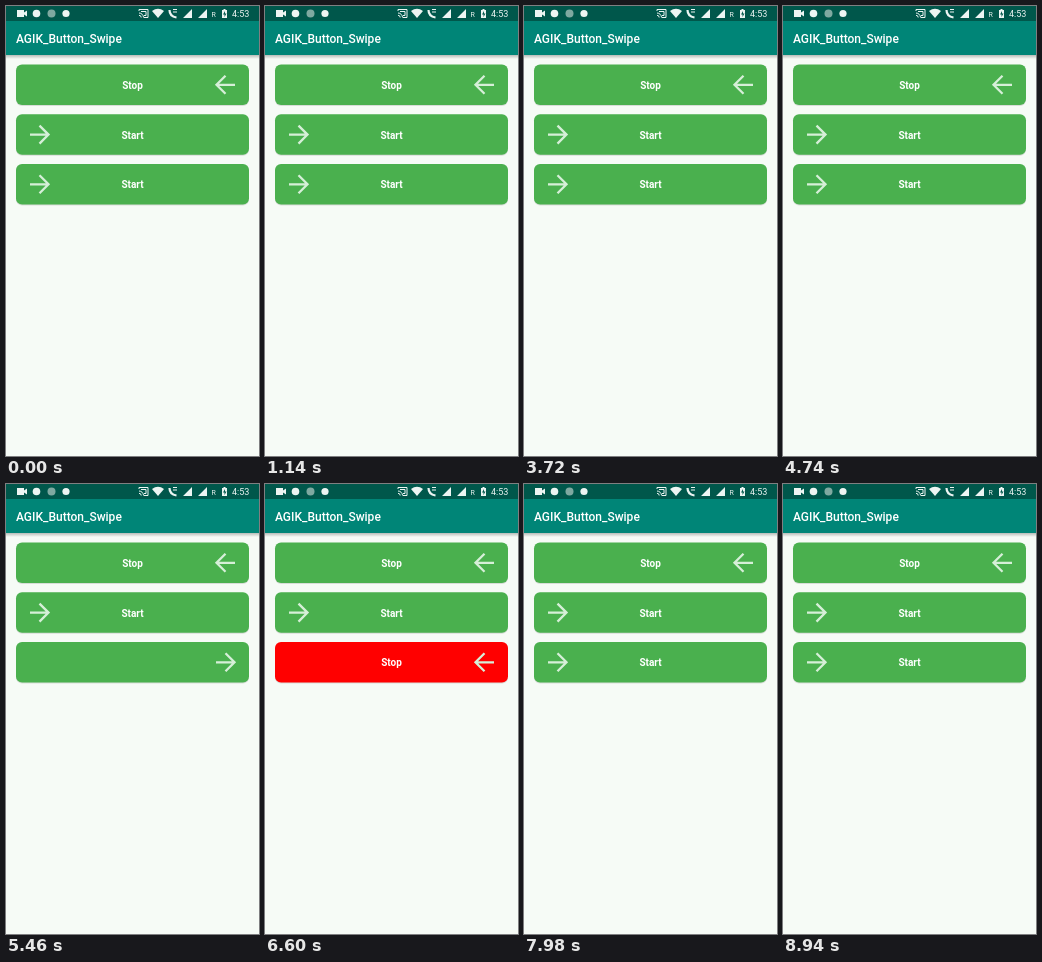
Recreate the animation shown at these times as an HTML page. Size 253 by 450 pixels, loop 9 s.

```html
<!DOCTYPE html>
<html lang="en">
<head>
<meta charset="utf-8">
<title>Swipe buttons</title>
<style>
  html, body { margin: 0; width: 100%; height: 100%; overflow: hidden; background: #f6fbf6; }
  svg { display: block; font-family: Roboto, sans-serif; }
  .button text { font-size: 10px; font-weight: 600; fill: #fff; text-anchor: middle; }
  .arrow { fill: none; stroke: #d6efd8; stroke-width: 2.3; }
  .title { font-size: 12px; font-weight: 500; fill: #fff; }
  .status { fill: #edf5f3; font-size: 9px; }
  .line { fill: none; stroke: #edf5f3; }
</style>
</head>
<body>
<svg id="stage" width="253" height="450" viewBox="0 0 253 450">
  <defs>
    <linearGradient id="shade" x2="0" y2="1">
      <stop stop-color="#000" stop-opacity=".25"/>
      <stop offset="1" stop-color="#000" stop-opacity="0"/>
    </linearGradient>
  </defs>
  <rect width="253" height="450" fill="#f6fbf6"/>
  <rect y="49" width="253" height="4" fill="url(#shade)"/>
  <rect width="253" height="49" fill="#008577"/>
  <rect width="253" height="15" fill="#00574b"/>
  <text class="title" x="10" y="37">AGIK_Button_Swipe</text>

  <g class="status">
    <path d="M11 4h7v2.5l3-2v6l-3-2V11h-7z"/>
    <circle cx="30.5" cy="7.5" r="3.8"/>
    <circle cx="45.5" cy="7.5" r="4" fill="#7fa9a1"/>
    <circle cx="60" cy="7.5" r="3.6"/>
    <path class="line" d="M133 5V3.5h9v8h-4M133 7a4.5 4.5 0 0 1 4.5 4.5M133 9.3a2.2 2.2 0 0 1 2.2 2.2M135 5.5h5v4h-2"/>
    <path d="M146 5q6-4.5 12 0l-6 7z"/>
    <path class="line" d="M163.5 4q0 6.500 7 7.500" stroke-width="2.2"/>
    <path class="line" d="M167 3.500h4M167 6h4" stroke-width="1.2"/>
    <path d="M186 3v9h-9zM201 3v9h-9z"/>
    <text x="205.500" y="11" font-size="7">R</text>
    <path d="M217.500 3h2v1h1.500v8h-5V4h1.500z"/>
    <path d="M219 5l-2 3.500h1.500v2.500l2-3.500H219z" fill="#00574b"/>
    <text x="226" y="11">4:53</text>
  </g>
</svg>
<script>
const stage = document.getElementById('stage');
const LEFT = 33.5, TRAVEL = 186, GREEN = '#4ab04e', RED = '#ff0000';

function createButton(y) {
  const group = document.createElementNS('http://www.w3.org/2000/svg', 'g');
  group.setAttribute('class', 'button');
  group.innerHTML = `
    <rect x="10" y="${y + 1}" width="233" height="40.5" rx="6" fill="#000" opacity=".12"/>
    <rect class="face" x="10" y="${y}" width="233" height="40.5" rx="6"/>
    <text x="126.5" y="${y + 24.2}"></text>
    <path class="arrow" d="M-9.500 0H9M0-9L9 0L0 9"/>`;
  stage.append(group);
  const [face, label, arrow] = ['.face', 'text', '.arrow'].map(s => group.querySelector(s));

  // position runs from 0 (left end) to 1 (right end)
  return (active, position, color = GREEN) => {
    face.setAttribute('fill', color);
    label.textContent = active ? 'Stop' : 'Start';
    label.setAttribute('opacity', active ? position : 1 - position);
    arrow.setAttribute('transform',
      `translate(${LEFT + TRAVEL * position} ${y + 20.3}) scale(${active ? -1 : 1} 1)`);
  };
}

const [first, second, third] = [58.500, 108.300, 158].map(createButton);

function ramp(t, start, duration) {
  const u = Math.min(1, Math.max(0, (t - start) / duration));
  return u * u * (3 - 2 * u);
}

function draw() {
  const t = Math.floor(performance.now() % 9000 / 60) * 60;
  const active = t >= 5580 && t < 7620;
  first(true, 1);
  second(false, ramp(t, 2520, 450) - ramp(t, 3120, 300));
  third(active, t < 7620 ? ramp(t, 4800, 600) - ramp(t, 6960, 495) : 0, active ? RED : GREEN);
  requestAnimationFrame(draw);
}
draw();
</script>
</body>
</html>
```
